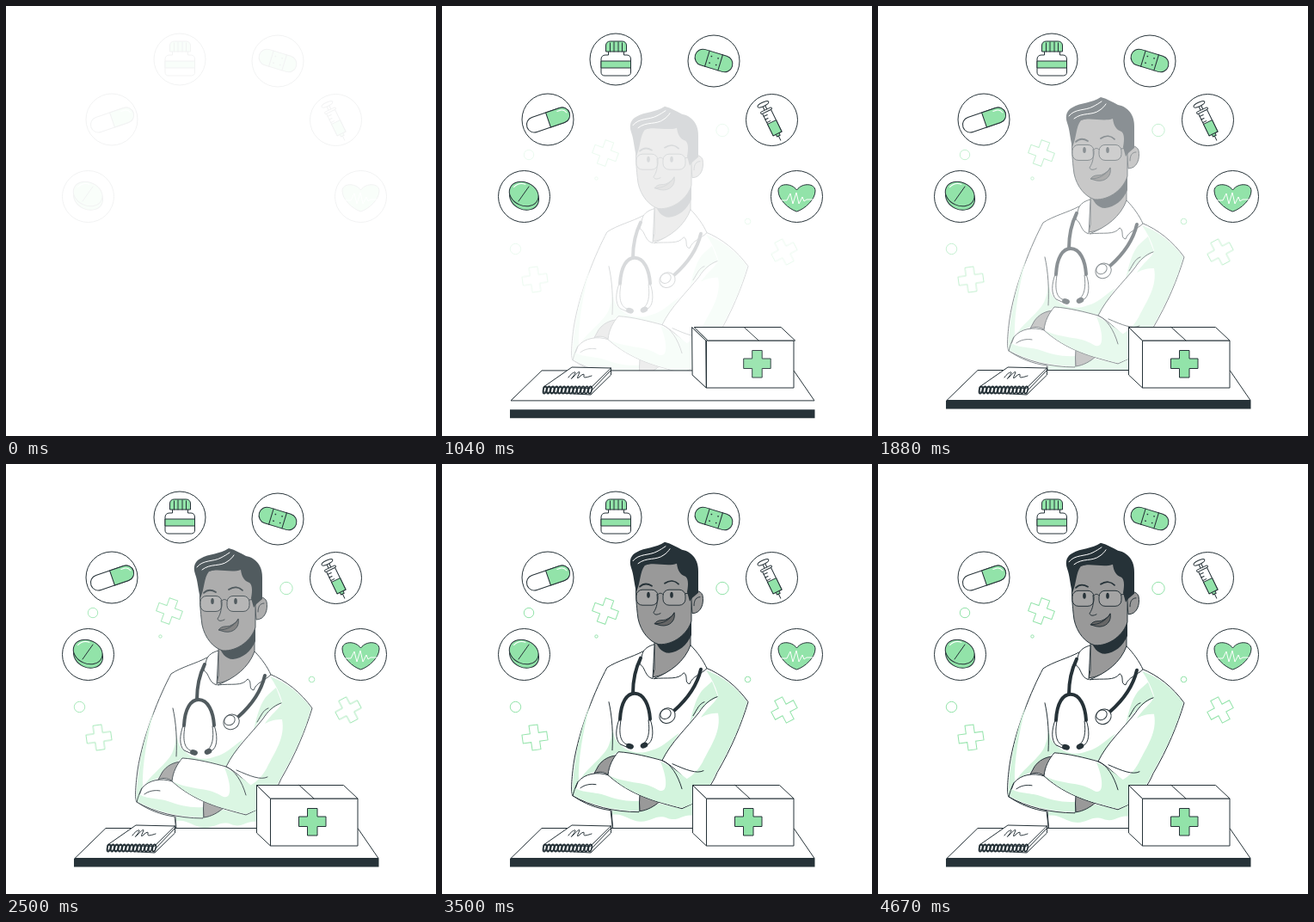
Write an HTML page that moves like this. It is 500 by 500 pixels and loops after 4.71 s.

```html
<!DOCTYPE html>
<html lang="en">
<head>
<meta charset="utf-8">
<title>Doctor at the desk</title>
<style>
html, body { margin: 0; width: 100%; height: 100%; overflow: hidden; background: #fff; }
svg { display: block; width: 100vw; height: 100vh; }
.line { fill: none; stroke: #263238; stroke-linecap: round; stroke-linejoin: round; }
.white { fill: #fff; stroke: #263238; stroke-linejoin: round; }
.green { fill: #92e3a9; stroke: #263238; stroke-linejoin: round; }
.skin { fill: #999; stroke: #263238; stroke-linejoin: round; }
.mint { fill: #d3f4dd; }
.dark { fill: #263238; }
.shine { fill: none; stroke: #fff; stroke-linecap: round; stroke-linejoin: round; }
.tube { fill: none; stroke: #263238; stroke-width: 4; stroke-linecap: round; }
.deco { fill: none; stroke: #92e3a9; }
</style>
</head>
<body>
<svg viewBox="0 0 500 500">
<defs>
  <path id="plus" d="M-5-14.500H5V-5H14.500V5H5V14.500H-5V5H-14.500V-5H-5Z"/>
</defs>

<g id="deco" class="deco">
  <use href="#plus" transform="translate(190 171) rotate(20)"/>
  <use href="#plus" transform="translate(108 318) rotate(-8)"/>
  <use href="#plus" transform="translate(398 286) rotate(-28)"/>
  <circle cx="101" cy="173" r="5.7"/>
  <circle cx="326" cy="144.500" r="7.2"/>
  <circle cx="179.500" cy="200.500" r="1.7"/>
  <circle cx="355.500" cy="250.500" r="3.3"/>
  <circle cx="85.500" cy="282.500" r="6.2"/>
</g>

<g id="doctor">
  <!-- coat -->
  <path class="white" d="M234 219C221 226 204 230 192 238C179 262 159 310 153 350C150 372 150 385 152 387C165 396 180 402 196 404L199 430H292V396C306 386 314 374 320 360C337 331 348 304 356 278C343 260 326 246 306 238L289 212Z"/>
  <path class="mint" d="M307 241C326 248 343 261 355 278C347 306 336 330 320 358C312 375 304 388 291 395L280 400L252 373C272 377 292 368 303 348C313 328 325 312 321 291C314 291 308 292 301 296C309 284 321 276 321 270C318 259 313 250 307 241Z"/>
  <path class="mint" d="M305 262C296 270 292 286 288 303C296 288 308 278 321 272L314 254Z"/>
  <path class="mint" d="M198 308C200 318 202 324 208 328C216 336 229 340 244 334C256 331 261 324 276 314L256 345L205 336L199 340C194 346 185 347 177 359L162 366C172 352 190 340 194 328C197 321 198 314 198 308Z"/>
  <path class="mint" d="M172 281C160 312 152 350 151.500 386L159 371C158 345 164 312 172 281Z"/>
  <path class="mint" d="M198 404H232L253 396L278 402L291 397V410C280 408 274 418 262 413C249 408 243 418 230 417C217 416 212 407 198 409Z"/>
  <path class="line" d="M194 278C198 295 199 316 198 334M197 404L199 430"/>
  <!-- lower forearm -->
  <path class="skin" d="M229 384C239 386 249 389 253 394C247 399 239 404 230 405Z"/>
  <path class="white" d="M158 371C166 361 181 359 193 363C207 367 219 378 230 385L229 406C201 406 172 399 152 387Z"/>
  <path class="mint" d="M153 376C160 384 176 382 188 386C202 391 214 394 229 393V405C203 405 173 398 152.500 386.500Z"/>
  <path class="line" d="M152 387C154 380 156 374 158 371M161 378C166 374 173 373 179 374"/>
  <!-- upper forearm -->
  <path class="skin" d="M204 340C194 341 187 345 182 352L177 361C184 358 189 360 194 363Z"/>
  <path class="white" d="M205 336C222 337 241 342 256 346C272 354 280 367 292 374V396L279 402C249 394 220 387 193 363C194 352 199 343 205 336Z"/>
  <path class="mint" d="M194 363C212 373 235 370 249 379C263 388 263 369 254 347C270 354 281 365 292 373V396L279 401C249 394 219 386 194 363Z"/>
  <path class="line" d="M256 346C266 325 284 309 299 290C304 282 311 275 320 272M256 346C266 350 274 362 279 379M268 350C284 357 296 362 304 358M292 294C297 286 299 280 305 278"/>
  <!-- neck and collar -->
  <path class="skin" d="M247 194V240L245 249C262 247 278 235 289 216V175Z"/>
  <path class="dark" d="M247 204C250 213 255 221 264 221C275 220 285 212 290 200V174C279 196 263 204 247 204Z"/>
  <path class="white" d="M247 211C240 213 235 216 233 222L230 234C237 238 235 248 245 251L246 232Z"/>
  <path class="white" d="M289 212C297 220 304 230 308 239C301 246 291 248 288 257C281 256 287 247 281 244C275 253 262 249 246 251C266 243 282 231 289 212Z"/>
  <!-- stethoscope -->
  <path class="tube" d="M231 227C226 237 222 252 222 268"/>
  <path class="tube" d="M301 240C297 257 287 273 270 288"/>
  <path class="white" d="M206 298C202 309 201 321 207 327L216 331L217 328C208 326 205 317 208 299ZM242 298C246 309 246 321 241 326L235 330L233 327C240 324 242 312 240 299Z"/>
  <path class="tube" d="M207 298C208 278 215 268 224 268C235 268 241 282 242 298"/>
  <ellipse class="dark" cx="218.500" cy="329.500" rx="4.500" ry="3.200" transform="rotate(18 218.500 329.500)"/>
  <ellipse class="dark" cx="235" cy="328.500" rx="4.500" ry="3.200" transform="rotate(-25 235 328.500)"/>
  <ellipse class="white" cx="262" cy="294" rx="9.500" ry="8.500" transform="rotate(-35 262 294)"/>
  <ellipse class="white" cx="260" cy="292" rx="6.500" ry="5.500" transform="rotate(-35 260 292)"/>
  <!-- head -->
  <path class="skin" d="M289 153C293 147 301 148 303 154C305 164 301 175 291 175Z"/>
  <path class="line" d="M293 166C293 159 296 156 300 156"/>
  <path class="skin" d="M227 121C224 145 226 166 228 181C231 196 241 208 252 211C270 212 286 198 290 184V135L274 108Z"/>
  <path class="dark" d="M226 150C223 138 223 130 220 122C217 113 220 107 226 104C236 98 249 99 259 92C267 94 273 98 279 101C290 103 299 112 298 128V151L291 157L288 161L285 150C287 140 286 134 283 132C277 130 274 125 273 117C262 121 247 115 236 119C230 126 231 139 226 150Z"/>
  <path class="shine" d="M222 114C229 105 241 108 250 103C254 101 257 99 260 97M228 117C238 109 249 114 258 107C261 105 263 103 265 100"/>
  <g stroke="#263238" fill="#a4a4a4">
    <rect x="226" y="147.500" width="25" height="18" rx="7"/>
    <rect x="257" y="147.500" width="26" height="18" rx="7"/>
  </g>
  <path class="line" d="M251 153C253 151 255 151 257 153M283 152L291 151M250 153C251 162 250 168 246 174C247 177 250 177 254 175"/>
  <path class="line" stroke-width="1.800" d="M230 144C234 140 239 140 244 143M259 140C265 136 271 137 275 141"/>
  <ellipse class="dark" cx="240" cy="153.500" rx="1.800" ry="3.500"/>
  <ellipse class="dark" cx="267" cy="153.500" rx="1.800" ry="3.500"/>
  <path d="M247 187C252 181 257 184 261 182C265 180 268 178 270 174C272 183 265 191 254 189Z" fill="#666" stroke="#263238"/>
  <path class="line" d="M248 187C257 187 264 183 270 175"/>
</g>

<g id="desk"><path class="white" d="M116 423.500H409L433 458.500H80Z"/></g>
<path id="bar" class="dark" d="M79 458.500H433.500V468.500H79Z"/>

<g id="notebook">
  <path class="white" d="M196.500 421V429L173 452L118 449V443Z"/>
  <path class="white" d="M151 420L196.500 421L172.500 444.500L118 443Z"/>
  <path class="line" d="M196 424L174 447M147 432C150 427 156 424 155 427C151 433 148 436 153 431C157 427 160 424 160 426C158 431 156 434 159 432C163 428 166 427 165 430C164 433 168 432 174 430"/>
  <g id="rings" class="line" stroke-width="1.700"></g>
</g>

<path id="boxSide" class="white" d="M291.500 373.500L307.500 389V444L291.500 429Z"/>
<path id="boxFront" class="white" d="M307.500 389H409V444H307.500Z"/>
<path id="boxTop" class="white" d="M291.500 373.500H392.500L409 389H307.500Z"/>
<g id="boxCross">
  <path class="line" d="M341 373.500L358 389"/>
  <path class="green" d="M350.500 400.500H362V410H372V421.500H362V432H350.500V421.500H340.500V410H350.500Z"/>
</g>

<g id="icons">
  <g class="white">
    <circle cx="202" cy="62" r="30"/><circle cx="316" cy="64" r="30"/>
    <circle cx="123" cy="132" r="30"/><circle cx="383.500" cy="132.500" r="30"/>
    <circle cx="95.500" cy="221.500" r="30"/><circle cx="412.500" cy="221.500" r="30"/>
  </g>
  <!-- bottle -->
  <path class="white" d="M193.500 52H211.500V57H215C218 57 219.500 59 219.500 62V77C219.500 79.500 218 81 215.500 81H189C186.500 81 185 79.500 185 77V62C185 59 187 57 190 57H193.500Z"/>
  <path class="green" d="M185 64H219.500V72H185ZM190.500 53V46C190.500 43 192.500 41 195.500 41H209.500C212.500 41 214.500 43 214.500 46V53Z"/>
  <path class="line" d="M195.500 43V53M200 42V53M205 42V53M209.500 43V53"/>
  <!-- plaster -->
  <g transform="translate(316 63.500) rotate(17)">
    <rect class="green" x="-22.500" y="-9.500" width="45" height="19" rx="9.500"/>
    <path class="line" d="M-8-9.500V9.500M8-9.500V9.500"/>
    <path class="line" stroke-width="1.600" d="M-4-4h.1M4-4h.1M-4 4h.1M4 4h.1"/>
  </g>
  <!-- capsule -->
  <g transform="translate(123.500 132.500) rotate(-19)">
    <rect class="white" x="-26" y="-9" width="52" height="18" rx="9"/>
    <path class="green" d="M0-9H17A9 9 0 0 1 17 9H0Z"/>
    <path class="shine" d="M13-6H17C20-6 22-4 23-1"/>
  </g>
  <!-- syringe -->
  <g transform="translate(383.500 135) rotate(-26)">
    <path class="line" d="M0 15V23.500"/>
    <path class="white" d="M-1.500-23H1.500V-14H-1.500ZM-5.500-14H5.500V15H-5.500Z"/>
    <path class="green" d="M-5.500 0H5.500V15H-5.500ZM-2 15H2V18H-2Z"/>
    <path class="line" d="M-5.500-10H-1M-5.500-6H-2M-5.500-2H-1"/>
    <ellipse class="white" cy="-23" rx="7" ry="2.300"/>
    <rect class="white" x="-7" y="-16" width="14" height="2.500" rx="1.200"/>
  </g>
  <!-- tablet -->
  <g transform="rotate(24 95 219)">
    <ellipse class="green" cx="97" cy="222" rx="17.500" ry="14"/>
    <ellipse class="green" cx="95" cy="218.500" rx="17.500" ry="13.500"/>
    <path class="shine" d="M81 216C83 211 87 208 92 207.500"/>
  </g>
  <path class="line" d="M89 227L101 210"/>
  <!-- heart -->
  <path class="green" d="M412.500 239C403 236 391 225 391 215C391 206 406 205 412.500 214C419 205 434 206 434 215C434 225 422 236 412.500 239Z"/>
  <path class="shine" d="M394 226H401L405 218L408 230L412 217L415 230L419 222L421 227L424 225H431"/>
</g>
</svg>

<script>
const LOOP = 4710;
const part = Object.fromEntries([...document.querySelectorAll('svg [id]')].map(el => [el.id, el]));
const clamp = v => Math.max(0, Math.min(1, v));

part.rings.innerHTML = Array.from({ length: 13 }, (_, i) => {
  const x = 119.5 + i * 4.4;
  return `<ellipse cx="${x}" cy="446.5" rx="1.8" ry="4.2" transform="rotate(12 ${x} 446.5)"/>`;
}).join('');

const ease = (t, start, end) => 0.5 - 0.5 * Math.cos(Math.PI * clamp((t - start) / (end - start)));

function bezier(x, x1, y1, x2, y2) {
  const at = (s, a, b) => 3 * (1 - s) * (1 - s) * s * a + 3 * (1 - s) * s * s * b + s * s * s;
  let low = 0, high = 1;
  for (let i = 0; i < 24; i++) {
    const mid = (low + high) / 2;
    if (at(mid, x1, x2) < x) low = mid; else high = mid;
  }
  return at(low, y1, y2);
}

// Moves a part, optionally leaning it around the height midY.
function pose(el, x, y, opacity, lean = 0, midY = 0) {
  el.setAttribute('transform',
    `translate(${x} ${y + midY}) skewX(${lean}) translate(0 ${-midY})`);
  el.setAttribute('opacity', clamp(opacity));
}

function draw(t) {
  const rise = bezier(t / LOOP, 0.36, -0.01, 0.5, 1.38);
  pose(part.doctor, 0, 30 * (1 - rise), rise);
  pose(part.deco, 0, 0, rise);
  pose(part.icons, 0, 0, (t + 45) / 780);

  const set = ease(t, 0, 1120), rest = 1 - set;
  pose(part.desk, 0, 33 * rest, set * 1.5);
  pose(part.boxSide, -47 * rest, 0, set * 1.5, Math.min(20, 40 * rest), 409);
  pose(part.boxTop, 135 * rest, 0, set * 1.5);

  const front = ease(t, 0, 760);
  pose(part.boxFront, 100 * (1 - front), 0, front, -Math.min(20, 250 * (1 - front)), 420);

  const book = ease(t, 0, 720);
  pose(part.notebook, -150 * (1 - book), 0, book);

  const bar = ease(t, 380, 1500);
  pose(part.bar, 0, 30 * (1 - bar), bar * 1.55);

  const cross = ease(t, 700, 1130);
  pose(part.boxCross, 100 * (1 - cross), 0, cross);
}

const begin = performance.now();
function tick() {
  draw((performance.now() - begin) % LOOP);
  requestAnimationFrame(tick);
}
tick();
</script>
</body>
</html>
```
